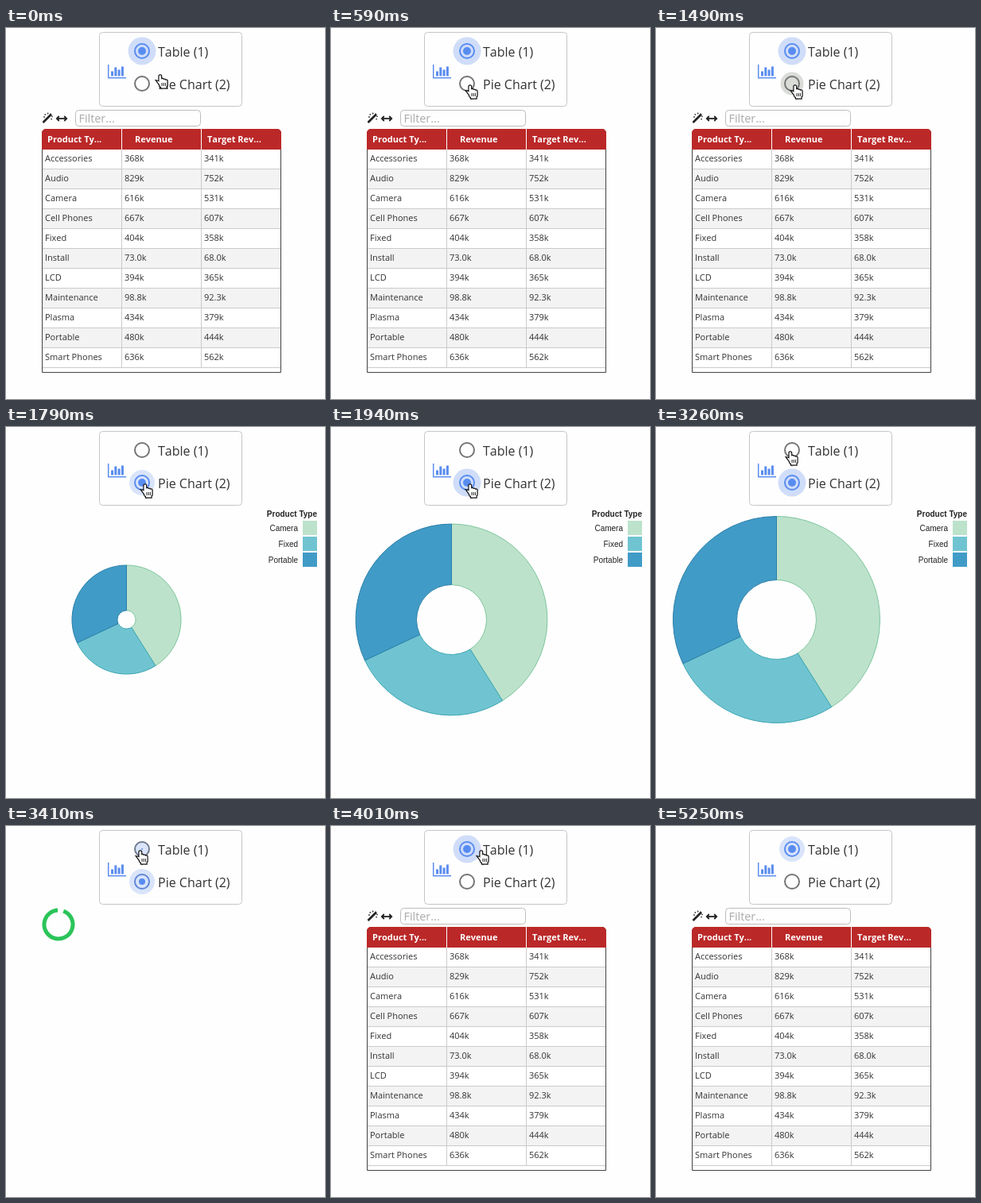
These frames come from a looping animation (401x467 px, 5350 ms). An HTML page with a canvas:

```html
<!DOCTYPE html>
<html lang="en">
<head>
<meta charset="utf-8">
<title>Table and pie chart switch</title>
<style>
  html, body { margin: 0; overflow: hidden; background: #fefefe; }
  canvas { display: block; }
</style>
</head>
<body>
<canvas id="stage" width="401" height="467"></canvas>
<script>
const ctx = document.getElementById('stage').getContext('2d');
const LOOP = 5350, TICK = 148.3;
const TO_PIE = 1540, TO_TABLE = 3355;
const SANS = '"Open Sans", "Noto Sans", sans-serif';
const ARIAL = '"Liberation Sans", Arial, sans-serif';
const BLUE = [88, 140, 240], GRAY = [117, 117, 117];

const rows = `Accessories,368k,341k
Audio,829k,752k
Camera,616k,531k
Cell Phones,667k,607k
Fixed,404k,358k
Install,73.0k,68.0k
LCD,394k,365k
Maintenance,98.8k,92.3k
Plasma,434k,379k
Portable,480k,444k
Smart Phones,636k,562k`.split('\n').map(row => row.split(','));
const palette = {
  Camera: ['#bde2cb', '#7cc69d'],
  Fixed: ['#70c4d1', '#3ca5b3'],
  Portable: ['#419bc7', '#2b7fa8']
};
const slices = rows.filter(([name]) => palette[name])
  .map(([name, revenue]) => ({ name, value: parseFloat(revenue), colors: palette[name] }));
const total = slices.reduce((sum, s) => sum + s.value, 0);

const clamp = v => Math.min(1, Math.max(0, v));
const ramp = (t, from, to) => clamp((t - from) / (to - from));
const lerp = (a, b, k) => a + (b - a) * k;
const cubic = k => k < .5 ? 4 * k ** 3 : 1 - 4 * (1 - k) ** 3;
const mix = (a, b, k) => `rgb(${a.map((v, i) => Math.round(lerp(v, b[i], k)))})`;

function text(str, x, y, font, color = '#333', align = 'left') {
  ctx.font = font;
  ctx.fontKerning = font.endsWith(SANS) ? 'none' : 'normal';
  ctx.fillStyle = color;
  ctx.textAlign = align;
  ctx.fillText(str, x, y);
}

function box(x, y, w, h, color) {
  ctx.fillStyle = color;
  ctx.fillRect(x, y, w, h);
}

function stroke(width, color) {
  ctx.lineWidth = width;
  ctx.strokeStyle = color;
  ctx.stroke();
}

function frame(x, y, w, h, radius, color) {
  ctx.beginPath();
  ctx.roundRect(x, y, w, h, radius);
  stroke(1, color);
}

function disc(x, y, r, color) {
  ctx.beginPath();
  ctx.arc(x, y, r, 0, 7);
  ctx.fillStyle = color;
  ctx.fill();
}

function line(width, color, ...points) {
  ctx.beginPath();
  points.forEach(([x, y]) => ctx.lineTo(x, y));
  stroke(width, color);
}

function radio(label, y, on, pulse) {
  const settling = pulse === 16;
  disc(171, y, Math.min(pulse, 20 * Math.sqrt(on)), settling ? '#d9e4fa' : '#d0ddf9');
  ctx.beginPath();
  ctx.arc(171, y, 9, 0, 7);
  stroke(2, mix(GRAY, BLUE, on));
  disc(171, y, 5 * on, mix(BLUE, BLUE, 0));
}

function drawPanel(t, time) {
  frame(117.5, 5.5, 179, 93, 4, '#c6c6c6');
  line(1.5, '#5b8def', [128.7, 46], [128.7, 62.8], [151, 62.8]);
  [6, 11, 8, 12].forEach((h, i) => box(132 + 4.3 * i, 60.5 - h, 3, h, '#5b8def'));

  // The focus halo is smaller and paler shortly after a click and late in the loop.
  const sinceClick = t - (t < TO_TABLE ? TO_PIE : TO_TABLE);
  const pulse = sinceClick > 0 && sinceClick < 350 || time >= 5250 ? 16 : 17.5;
  const pie = ramp(t, TO_PIE, TO_PIE + 230) - ramp(t, TO_TABLE, TO_TABLE + 285);
  if (t > TO_PIE - 100 && t < TO_PIE) disc(171, 70, 14.5, '#dadcd8');
  radio('table', 29, 1 - pie, pulse);
  radio('pie', 70, pie, pulse);
  text('Table (1)', 191, 36, '16px ' + SANS);
  text('Pie Chart (2)', 191, 77, '16px ' + SANS);
}

function drawToolbar() {
  line(2.6, '#222', [46.5, 119], [57, 108.5]);
  for (let i = 0; i < 6; i++) {
    const a = Math.PI + i * .75;
    disc(53 + 5 * Math.cos(a), 112 + 4.5 * Math.sin(a), .9, '#333');
  }
  line(1.8, '#222', [65, 114], [75, 114]);
  for (const side of [-1, 1]) {
    const x = 70 + 3.2 * side;
    line(1.8, '#222', [x, 111], [x + 3 * side, 114], [x, 117]);
  }
  frame(87.5, 103.5, 157, 20, 4, '#bdbdbd');
  text('Filter...', 91.5, 119, '14.4px ' + SANS, '#aaa');
}

function drawTable() {
  drawToolbar();
  box(46, 153, 299, 280, '#fff');
  rows.forEach((row, i) => {
    const y = 153 + 25 * i;
    if (i % 2) box(46, y, 299, 25, '#f3f3f3');
    box(46, y + 24, 299, 1, '#cbcbcb');
    row.forEach((cell, c) => text(cell, 49 + 100 * c, y + 15, '11px ' + SANS));
  });
  frame(45.5, 127.5, 300, 306, [5, 5, 0, 0], '#444');
  ctx.beginPath();
  ctx.roundRect(45, 127, 301, 26, [5, 5, 0, 0]);
  ctx.fillStyle = '#bb2828';
  ctx.fill();
  for (const x of [145, 245]) {
    box(x, 127, 1, 26, '#fff');
    box(x, 153, 1, 275, '#cbcbcb');
  }
  const heading = 'bold 11px ' + SANS;
  text('Product Ty...', 52, 144, heading, '#fff');
  text('Revenue', 162, 144, heading, '#fff');
  text('Target Rev...', 253, 144, heading, '#fff');
}

function drawPie(t) {
  const grow = cubic(ramp(t, 1590, 2080));
  const inner = 50 * grow, outer = lerp(50, 130, grow);
  let angle = -Math.PI / 2;
  text('Product Type', 391, 113, 'bold 10px ' + ARIAL, '#222', 'right');
  slices.forEach(({ name, value, colors: [fill, edge] }, i) => {
    const end = angle + value / total * 2 * Math.PI;
    ctx.beginPath();
    ctx.arc(151.5, 242.5, outer, angle, end);
    ctx.arc(151.5, 242.5, inner, end, angle, true);
    ctx.closePath();
    ctx.fillStyle = fill;
    ctx.fill();
    stroke(1, edge);
    angle = end;
    box(373, 118 + 20 * i, 18, 18, fill);
    text(name, 367, 131 + 20 * i, '10px ' + ARIAL, '#222', 'right');
  });
}

function drawSpinner(t) {
  const start = -1.22 + (t - 23 * TICK) * .006;
  ctx.beginPath();
  ctx.arc(66, 124, 18, start, start + 5.88);
  stroke(5, '#2bc45a');
}

function makeHand() {
  const hand = new Path2D();
  hand.roundRect(4.5, 1.5, 2.6, 12, 1.3);
  for (let i = 0; i < 3; i++) hand.roundRect(7.1 + 2.4 * i, 6 + .7 * i, 2.6, 8, 1.3);
  hand.roundRect(5, 9, 9.5, 7, 2.5);
  hand.rect(7, 13, 6.5, 4.5);
  hand.moveTo(1.5, 8.6);
  hand.lineTo(3.5, 9);
  hand.lineTo(7, 12);
  hand.lineTo(7, 16);
  hand.closePath();
  return hand;
}
const hand = makeHand();

function pointerAt(n) {
  const toPie = ramp(n, 0, 4), back = ramp(n, 15, 18), settle = ramp(n, 18, 22);
  const aside = ramp(n, 25, 27), leave = ramp(n, 27, 29), exit = ramp(n, 30, 31);
  return [
    188 - 19 * toPie - 5 * back - settle + 20 * aside + 197 * leave - 17 * exit,
    58 + 13 * toPie - 31 * back - 10 * settle + 305 * leave + 92 * exit
  ];
}

function drawPointer(n) {
  if (n > 31) return;
  ctx.save();
  ctx.translate(...pointerAt(n));
  ctx.lineWidth = 2.4;
  ctx.strokeStyle = '#111';
  ctx.stroke(hand);
  ctx.fillStyle = '#fff';
  ctx.fill(hand);
  for (let i = 0; i < 3; i++) line(.9, '#111', [8 + 2.2 * i, 11], [8 + 2.2 * i, 15]);
  ctx.restore();
}

function draw(now) {
  const time = now % LOOP;
  // Motion is sampled on even ticks, like a screen recording.
  const n = Math.floor((time + 4) / TICK), t = n * TICK;
  box(0, 0, 401, 467, '#fefefe');
  drawPanel(t, time);
  if (n < 11 || n > 24) drawTable();
  else if (n < 23) drawPie(t);
  else drawSpinner(t);
  drawPointer(n);
  requestAnimationFrame(() => draw(performance.now() - origin));
}

const origin = performance.now();
draw(0);
</script>
</body>
</html>
```
